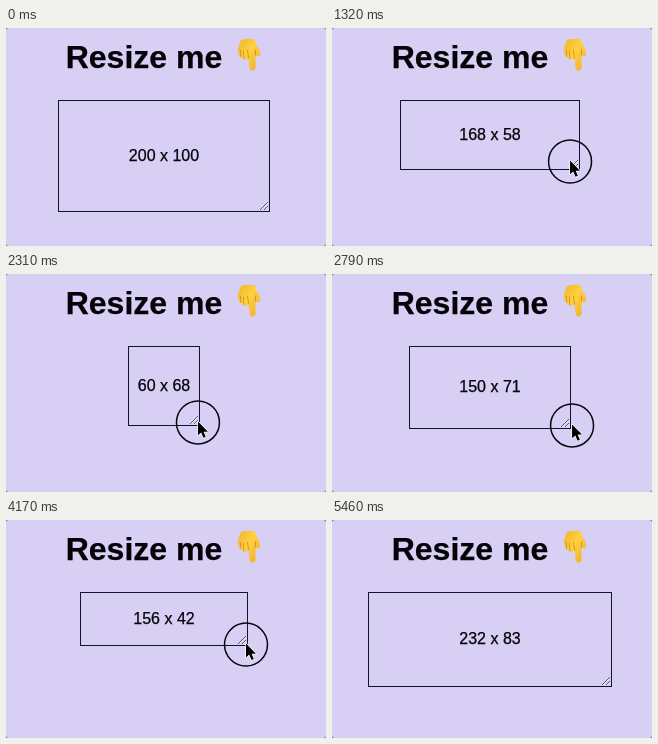
An HTML page that plays this animation: 320x218 px, repeating every 5520 ms.

```html
<!DOCTYPE html>
<html lang="en">
<head>
<meta charset="utf-8">
<title>Resize me</title>
<style>
  html, body { margin: 0; width: 100%; height: 100%; overflow: hidden; background: #77738a; }
  svg { display: block; width: 320px; height: 218px; }
  text { font-family: "Liberation Sans", Arial, Helvetica, sans-serif; fill: #050308; stroke: #050308; stroke-width: .25; }
</style>
</head>
<body>
<svg viewBox="0 0 320 218">
  <defs>
    <linearGradient id="skin" x1="0" x2="1" y1="0" y2="1">
      <stop offset="0" stop-color="#f2b32e"/>
      <stop offset=".45" stop-color="#fed13f"/>
      <stop offset="1" stop-color="#f0ac29"/>
    </linearGradient>
  </defs>
  <rect width="320" height="218" rx="3" fill="#d7cff4"/>
  <text x="59.7" y="40" font-size="32" font-weight="bold">Resize me</text>

  <g stroke-linecap="round" stroke-linejoin="round">
    <path fill="url(#skin)" d="M235 12 Q242 10 249 11.500 L250.500 17 Q254.500 22 254 27 Q252.500 30 249.500 27 L249.500 40 Q249 42.700 246.500 42.700 Q244 42.700 243.600 40 L242.500 30 Q240.500 33 238 31 Q235.500 31.500 234.800 28.500 Q232 28 232.200 24.500 Q231 21 233 17 Z"/>
    <path fill="none" stroke="#d58f25" stroke-width=".9" d="M242.500 30 L241.500 22 M238 31 L237.300 23 M234.800 28.500 L234.300 22 M249.500 27 V22"/>
  </g>

  <rect id="box" y="72.5" fill="none" stroke="#171130"/>
  <g id="grip" fill="none">
    <path d="M-10 -2 L-2 -10 M-6 -2 L-2 -6" stroke="#58536a"/>
    <path d="M-9 -2 L-2 -9 M-5 -2 L-2 -5" stroke="#fff" opacity=".6"/>
  </g>
  <text id="label" x="158" font-size="16" text-anchor="middle"></text>

  <g id="pointer">
    <circle id="ring" r="21.500" fill="none" stroke="#08050f" stroke-width="1.5"/>
    <path d="M0 -1 V12.800 L3.200 10 L5.500 15.300 L7.800 14.300 L5.600 9.200 H10 Z"
          fill="#000" stroke="#fff" stroke-width="1.4" stroke-linejoin="round" paint-order="stroke"/>
  </g>
</svg>
<script>
  const LOOP = 5520, STEP = 30, PRESS = 930, RELEASE = 4920, LEAVE = 5220;
  const CENTER = 158, TOP = 72, FRAME = 12, MIN_WIDTH = 60;

  // Turning points of the pointer on each axis: [time, position]
  const turnsX = [[360, 294], [780, 260], [960, 260], [2000, 178], [3100, 254],
    [3560, 156], [4170, 240], [4800, 276]];
  const turnsY = [[30, 216], [150, 180], [960, 180], [1470, 122], [2000, 147], [2760, 151],
    [3150, 179], [3500, 167], [3870, 109], [4700, 163], [RELEASE, 163], [LEAVE, 222]];

  const $ = id => document.getElementById(id);
  const set = (id, attrs) => Object.entries(attrs).forEach(([k, v]) => $(id).setAttribute(k, v));
  const clamp = (v, lo, hi) => Math.min(hi, Math.max(lo, v));
  const ease = u => (1 - Math.cos(Math.PI * clamp(u, 0, 1))) / 2;

  // Each swing adds its own eased share of the movement
  const swing = (turns, t) => turns.slice(1).reduce((sum, [end, to], i) => {
    const [begin, from] = turns[i];
    return sum + (to - from) * ease((t - begin) / (end - begin));
  }, turns[0][1]);

  function draw(t) {
    // The box trails the pointer slightly while it is dragged
    const dragged = (turns, lag) => Math.round(swing(turns, clamp(t - lag, PRESS, RELEASE)));
    const w = Math.max(MIN_WIDTH, 2 * (dragged(turnsX, 60) + 4 - CENTER) - FRAME);
    const h = dragged(turnsY, 30) + 4 - TOP - FRAME;
    const left = CENTER - (w + FRAME) / 2;

    set("box", { x: left + 0.5, width: w + FRAME - 1, height: h + FRAME - 1 });
    set("grip", { transform: `translate(${left + w + FRAME} ${TOP + h + FRAME})` });
    set("label", { y: Math.floor(TOP + (h + FRAME) / 2 + 5) });
    $("label").textContent = `${w} x ${h}`;

    set("pointer", {
      transform: `translate(${swing(turnsX, t)} ${swing(turnsY, t)})`,
      visibility: t >= STEP && t < LEAVE ? "visible" : "hidden"
    });
    set("ring", { opacity: t >= PRESS && t < RELEASE ? 1 : 0 });
  }

  const start = performance.now();
  function tick() {
    const t = (performance.now() - start) % LOOP;
    draw(Math.floor(t / STEP) * STEP);
    requestAnimationFrame(tick);
  }
  tick();
</script>
</body>
</html>
```
